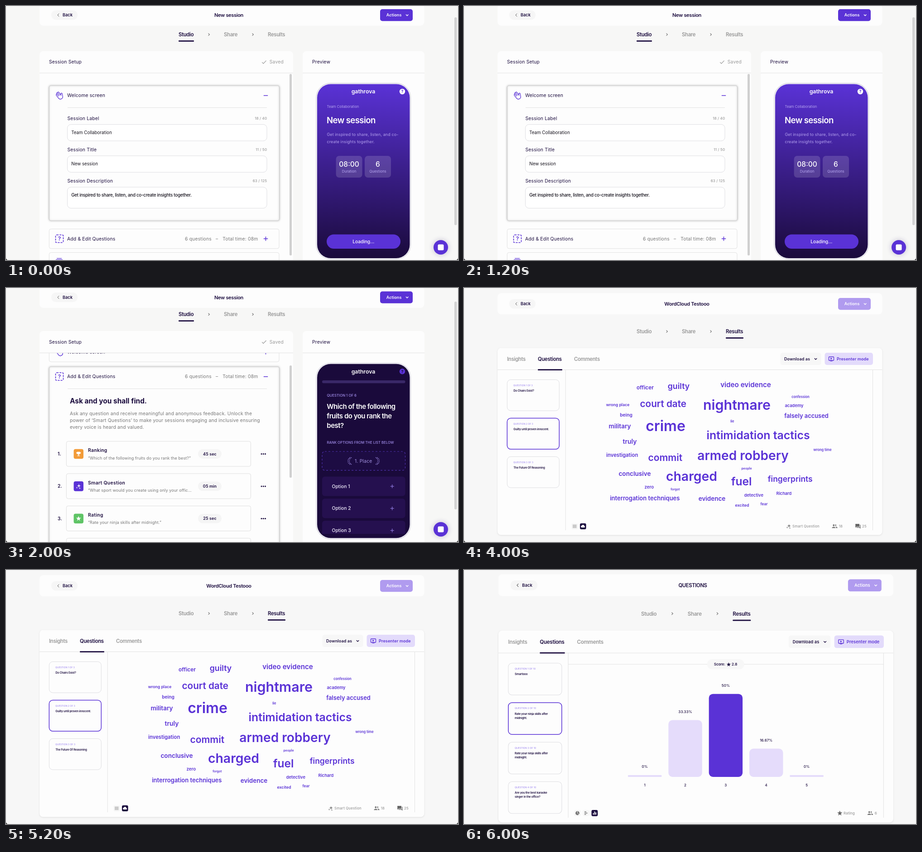
Recreate the animation shown at these times as an HTML page with a canvas. Size 998x561 px, loop 8 s.

```html
<!DOCTYPE html>
<html lang="en">
<head>
<meta charset="utf-8">
<title>Session builder</title>
<style>
html, body { margin: 0; width: 100%; height: 100%; overflow: hidden; background: #f7f7f7; }
canvas { display: block; width: 998px; height: 561px; }
</style>
</head>
<body>
<canvas id="stage"></canvas>
<script>
const W = 998, H = 561, LOOP = 8000, HOLD = 2000;
const PURPLE = '#5a32d6', INK = '#1c0d3f', GREY = '#999', MUTED = '#777', RULE = '#e2e2e2',
  CARD = '#fdfdfd', SOFT = '#f6f6f6', LILAC = '#e3dbfb', PALE = '#b09bef', NIGHT = '#1a0a3b';

// Type styles: weight, size, tracking
const LABEL = [400, 10.3, .2], BOLD = [600, 9, .1], TAB = [600, 11.3, -.3], TITLE = [600, 11, -.35],
  FIELD = [400, 9.75, 0], COUNT = [500, 7.9, .2], ITEM = [600, 10.3, .35], NOTE = [400, 9, .1],
  TINY = [600, 6.2, -.2], CHART = [500, 8, .05], FOOT = [500, 7.8, .15];

const canvas = document.getElementById('stage');
const dpr = window.devicePixelRatio || 1;
canvas.width = W * dpr;
canvas.height = H * dpr;
const c = canvas.getContext('2d');

function text(str, x, y, [weight, size, track], color = INK, align = 'left') {
  c.font = `${weight} ${size}px Inter, sans-serif`;
  c.letterSpacing = track + 'px';
  c.textAlign = align;
  c.fillStyle = color;
  c.fillText(str, x, y + size * .36);
}

function paint(fill, stroke, lw = 1) {
  if (fill) { c.fillStyle = fill; c.fill(); }
  if (stroke) { c.strokeStyle = stroke; c.lineWidth = lw; c.stroke(); }
}

function box(x0, y0, x1, y1, r, fill, stroke, lw) {
  c.beginPath();
  c.roundRect(x0, y0, x1 - x0, y1 - y0, r);
  paint(fill, stroke, lw);
}

function disc(x, y, r, fill) {
  c.beginPath();
  c.arc(x, y, r, 0, 7);
  paint(fill);
}

function line(color, lw, ...p) {
  c.beginPath();
  for (let i = 0; i < p.length; i += 2) c.lineTo(p[i], p[i + 1]);
  paint(null, color, lw);
}

function glyph(d, x, y, fill, stroke, lw = 1, turn = 0) {
  const path = new Path2D(d);
  c.save();
  c.translate(x, y);
  c.rotate(turn);
  if (fill) { c.fillStyle = fill; c.fill(path); }
  if (stroke) { c.strokeStyle = stroke; c.lineWidth = lw; c.stroke(path); }
  c.restore();
}

function star(x, y, r, color, points = 5, inner = .42) {
  c.beginPath();
  for (let i = 0; i < points * 2; i++) {
    const a = i * Math.PI / points - Math.PI / 2, q = i % 2 ? r * inner : r;
    c.lineTo(x + q * Math.cos(a), y + q * Math.sin(a));
  }
  c.closePath();
  paint(color);
}

const chevronDown = (x, y, color) => line(color, 1.4, x - 2.7, y - 1.3, x, y + 1.4, x + 2.7, y - 1.3);
const chevronRight = (x, y, color) => line(color, 1.2, x - 1.4, y - 2.6, x + 1.4, y, x - 1.4, y + 2.6);
const chevronLeft = (x, y, color) => line(color, 1, x + 1.6, y - 3.3, x - 1.6, y, x + 1.6, y + 3.3);

function minus(x, y, r = 4.7, color = PURPLE, lw = 1.5) {
  line(color, lw, x - r, y, x + r, y);
}

function plus(x, y, r = 4.7, color = PURPLE, lw = 1.5) {
  minus(x, y, r, color, lw);
  line(color, lw, x, y - r, x, y + r);
}

function sparkles(x, y, s, color) {
  star(x + .12 * s, y - .1 * s, s * .75, color, 4, .3);
  star(x - .6 * s, y + .55 * s, s * .38, color, 4, .3);
  star(x + .45 * s, y + .75 * s, s * .38, color, 4, .3);
}

function people(x, y) {
  glyph('M-4.2-2.3a2 2 0 1 0 4 0a2 2 0 1 0-4 0M-6 4V2.6Q-2.2-.6 1.6 2.6V4Z' +
    'M1-4.2a2 2 0 1 1 0 3.9Q2-2.2 1-4.2M2.2.8Q5 1 6 2.8V4H2.8Q3 2 2.2.8', x, y, '#777');
}

function hand(x, y) {
  glyph('M-5 1V-5a1.4 1.4 0 0 1 2.8 0V-7a1.4 1.4 0 0 1 2.8 0a1.4 1.4 0 0 1 2.8 0V1l1.8-2.4' +
    'a1.4 1.4 0 0 1 2.4 1.4L4.6 5.8A5.2 5.2 0 0 1-5 4ZM-2.2-5V0M.6-7V0M3.4-6V1', x, y, null, PURPLE, 1.3, -.65);
}

function questionIcon(x, y) {
  c.setLineDash([4.2, 2]);
  box(x - 8.5, y - 8.5, x + 8.5, y + 8.5, 2.5, null, PURPLE, 1.6);
  c.setLineDash([]);
  text('?', x, y, [600, 12, 0], PURPLE, 'center');
}

function corners() {
  glyph('M0 0V-5Q0 0 5 0Z', 0, H, '#111');
  glyph('M0 0V-5Q0 0-5 0Z', W, H, '#111');
}

function header(title, y, live) {
  box(74, y - 23.5, 923.5, y + 23.3, 8, CARD);
  box(100, y - 10.5, 158, y + 10.5, 10, SOFT);
  chevronLeft(115.5, y, '#555');
  text('Back', 125, y, [600, 9.2, 0]);
  text(title, 492, y, TITLE, INK, 'center');
  box(826, y - 13, 898, y + 13.2, 5, live ? PURPLE : PALE);
  text('Actions', 839.7, y, BOLD, '#fff');
  chevronDown(885.7, y, '#fff');
}

function steps(y, active) {
  [['Studio', 381, 415], ['Share', 481, 512], ['Results', 578, 617]].forEach(([name, x0, x1], i) => {
    text(name, x0, y, TAB, i === active ? INK : GREY);
    if (i === active) box(x0, y + 13, x1, y + 15.7, 1, INK);
  });
  chevronRight(448, y, MUTED);
  chevronRight(545, y, MUTED);
}

// Session editor

function panel(y0, y1) {
  c.save();
  c.shadowColor = 'rgba(0,0,0,.22)';
  c.shadowBlur = 4;
  box(95.3, y0, 603.5, y1, 4, CARD, '#cdcdcd', 1.2);
  c.restore();
}

function questionsHead(y) {
  questionIcon(118, y);
  text('Add & Edit Questions', 135, y, LABEL);
  text('6 questions', 395, y, LABEL, MUTED);
  text('–', 463, y, LABEL, MUTED);
  text('Total time: 08m', 478.3, y, LABEL, MUTED);
}

function editor(top, dy, body) {
  c.fillStyle = '#f7f7f6';
  c.fillRect(0, 0, W, H);
  header('New session', 20 + top, true);
  steps(63 + dy, 0);
  const y = 99.7 + dy;
  box(74, y, 634, 580, 8, CARD);
  box(655, y, 924, 580, 8, CARD);
  c.save();
  c.beginPath();
  c.rect(74, 148 + dy, 560, 500);
  c.clip();
  body();
  c.restore();
  line(RULE, 1, 74, y + 48.3, 634, y + 48.3);
  line(RULE, 1, 655, y + 48.3, 924, y + 48.3);
  text('Session Setup', 95, y + 24, LABEL);
  line(GREY, 1.2, 565.3, y + 24.5, 568.3, y + 27.5, 574.5, y + 21);
  text('Saved', 581.8, y + 24, LABEL, GREY);
  text('Preview', 676, y + 24, LABEL);
}

function overlay(scrollY) {
  box(990, scrollY, 995.5, scrollY + 459, 2.7, '#d2d2d2');
  c.save();
  c.shadowColor = 'rgba(60,40,120,.3)';
  c.shadowBlur = 12;
  disc(960, 533, 16, PURPLE);
  c.restore();
  box(953.5, 526.5, 966.5, 539.5, 2.5, '#fff');
  corners();
}

function phone(dy, fill, badge, mark) {
  box(685, 170.5 + dy, 893.5, 559 + dy, 32, '#f5f4fa', '#d6d5dd', 1.3);
  box(687, 172.5 + dy, 891.5, 557 + dy, 30, fill);
  text('gathrova', 789, 189 + dy, [600, 12.3, 0], '#fff', 'center');
  disc(875, 189 + dy, 6.2, badge);
  text('?', 875, 189 + dy, [700, 9, 0], mark, 'center');
}

function field(label, count, value, y, h, style = FIELD) {
  text(label, 135.5, y, LABEL);
  text(count, 576.2, y, COUNT, GREY, 'right');
  box(135.5, y + 13.6, 576, y + 13.6 + h, 8, '#fff', '#dedee2');
  text(value, 144.3, y + 31.3, style, '#15121c');
}

function chip(x, value, label) {
  box(x - 29, 331, x + 29, 379, 7, 'rgba(255,255,255,.15)');
  text(value, x, 349, [500, 15.5, 0], '#fff', 'center');
  text(label, x, 365, [400, 7.9, 0], '#b9a8f2', 'center');
}

function welcomeScene() {
  editor(0, 0, () => {
    panel(176, 474);
    hand(118, 198);
    text('Welcome screen', 135, 197.5, LABEL);
    minus(573.5, 197.7);
    line(RULE, 1, 136, 224.5, 576, 224.5);
    field('Session Label', '18 / 40', 'Team Collaboration', 248, 36.3);
    field('Session Title', '11 / 50', 'New session', 317.3, 36.3);
    field('Session Description', '63 / 125', 'Get inspired to share, listen, and co-create insights together.',
      386.5, 46.5, [500, 9.85, -.3]);
    box(95.3, 492.5, 603, 535.7, 4, CARD, RULE);
    questionsHead(514);
    plus(573.5, 514);
    box(95.3, 544.5, 603, 600, 4, CARD, RULE);
    line(PURPLE, 1.3, 112, 557.5, 123, 557.5);
    line(PURPLE, 1.3, 110, 560.6, 125, 560.6);
    box(626, 150, 631, 551, 2.5, '#d0d0d0');
  });
  const glow = c.createLinearGradient(0, 172, 0, 557);
  glow.addColorStop(0, PURPLE);
  glow.addColorStop(1, NIGHT);
  phone(0, glow, '#fff', PURPLE);
  text('Team Collaboration', 708.5, 222, [400, 7.5, .12], '#b9a8f2');
  text('New session', 708, 252, [600, 18.6, -.6], '#fff');
  text('Get inspired to share, listen, and co-', 708.5, 283.5, NOTE, '#b3a0ee');
  text('create insights together.', 708.5, 299.5, NOTE, '#b3a0ee');
  chip(757.6, '08:00', 'Duration');
  chip(821, '6', 'Questions');
  box(708, 504.5, 871, 536, 15.7, PURPLE);
  text('Loading...', 789.3, 520.3, [500, 10.2, -.05], '#fff', 'center');
  overlay(25);
}

function questionRow(i, title, quote, time, color) {
  const y = 366.3 + i * 71.35;
  text(i + 1 + '.', 114, y, [600, 10.2, .2]);
  box(133.3, y - 27.7, 540.5, y + 27.7, 4, CARD, '#dfdfdf');
  if (!title) return;
  box(149.5, y - 10.6, 171, y + 11, 4, color);
  if (i === 0) glyph('M-3-4.6H3V-3.6H5Q5.2-.2 2.4.2Q1.6 1.5.6 1.8V3.6H2.6V5H-2.6V3.6H-.6V1.8' +
    'Q-1.6 1.5-2.4.2Q-5.2-.2-5-3.6H-3Z', 160.2, y, '#fff');
  if (i === 1) sparkles(160.2, y, 6, '#fff');
  if (i === 2) star(160.2, y + .4, 5.8, '#fff');
  text(title, 181, y - 7.8, ITEM);
  text(quote, 181, y + 9.2, NOTE, MUTED);
  box(424, y - 10.2, 476, y + 10.6, 10.4, '#f5f5f5');
  text(time, 450, y, BOLD, INK, 'center');
  for (let k = -1; k < 2; k++) disc(568.3 + k * 4.2, y + .3, 1.5, INK);
}

function laurel(x, y, side) {
  for (let i = 0; i < 6; i++) {
    const a = -1.15 + i * .46, px = x + side * (7 * Math.cos(a) - 4), py = y + 8 * Math.sin(a);
    for (const k of [-1.5, 1.5]) {
      c.beginPath();
      c.ellipse(px + k, py, 1.4, .7, side * (k < 0 ? .8 : -.6), 0, 7);
      paint('#8f7dd0');
    }
  }
}

function option(n, y) {
  box(698, y - 21.5, 881.5, y + 21.5, 6, '#25104f');
  text('Option ' + n, 719.5, y, [500, 10.3, .05], '#f4f0ff');
  plus(852.7, y, 4, '#8f7be0', 1.2);
}

function questionsScene() {
  editor(.6, -4.7, () => {
    box(95.3, 120, 603, 163, 4, CARD, RULE);
    hand(118, 142);
    text('Welcome screen', 135, 141.3, LABEL);
    plus(573.5, 141.7);
    panel(174, 600);
    questionsHead(195.5);
    minus(573.5, 195.7);
    line(RULE, 1, 136, 222.5, 576, 222.5);
    text('Ask and you shall find.', 141, 249, [700, 15.4, 0]);
    ['Ask any question and receive meaningful and anonymous feedback. Unlock the',
      'power of ‘Smart Questions’ to make your sessions engaging and inclusive ensuring',
      'every voice is heard and valued.'].forEach((s, i) => text(s, 141, 277 + i * 15.2, LABEL, MUTED));
    questionRow(0, 'Ranking', '“Which of the following fruits do you rank the best?”', '45 sec', '#f29b38');
    questionRow(1, 'Smart Question', '“What sport would you create using only your offic...', '05 min', PURPLE);
    questionRow(2, 'Rating', '“Rate your ninja skills after midnight.”', '25 sec', '#5fc466');
    questionRow(3);
    box(626, 171, 631, 419, 2.5, '#d0d0d0');
  });
  phone(-4.7, NIGHT, PURPLE, NIGHT);
  box(698, 204, 881.5, 210.3, 3, '#3a2868');
  text('QUESTION 1 OF 6', 708.5, 237, [500, 7.8, 0], '#a38fec');
  ['Which of the following', 'fruits do you rank the', 'best?'].forEach((s, i) =>
    text(s, 708.3, 262 + i * 21, [600, 15, -.5], '#fff'));
  text('RANK OPTIONS FROM THE LIST BELOW', 708.5, 341.5, [500, 7.7, 0], '#a38fec');
  c.setLineDash([4, 4]);
  box(698, 361, 881.5, 402.7, 6, '#1d0c43', '#4d30ab', 1.2);
  c.setLineDash([]);
  text('1. Place', 789.3, 382, LABEL, '#a594e2', 'center');
  laurel(759.5, 382, -1);
  laurel(819.5, 382, 1);
  option(1, 438);
  option(2, 486.7);
  c.save();
  c.beginPath();
  c.rect(687, 500, 205, 43);
  c.clip();
  option(3, 535.5);
  c.restore();
  overlay(30);
}

// Results

function results(title, total, cards) {
  header(title, 35, false);
  steps(96, 2);
  c.save();
  c.shadowColor = 'rgba(0,0,0,.1)';
  c.shadowBlur = 3;
  c.shadowOffsetY = 1;
  box(74, 132.5, 923.5, 545.5, 8, CARD);
  c.restore();
  line(RULE, 1, 74, 180.6, 923.5, 180.6);
  line(RULE, 1, 224.2, 181, 224.2, 535);
  line(RULE, 1, 902.5, 181, 902.5, 535);
  text('Insights', 95, 156.8, TAB, GREY);
  text('Questions', 163, 156.8, TAB);
  text('Comments', 243, 156.8, TAB, GREY);
  box(163, 179.3, 217, 182, 1, INK);
  box(698.5, 143, 788.5, 170, 5, '#f7f7f7');
  text('Download as', 707, 156.6, BOLD);
  chevronDown(776.5, 156.6, INK);
  box(796.5, 143, 903, 170, 5, LILAC);
  box(805.5, 152, 816.5, 160, 1, null, PURPLE, 1.3);
  line(PURPLE, 1.3, 808.5, 161.2, 813.5, 161.2);
  glyph('M-1.6-2.2L2.2 0L-1.6 2.2Z', 811, 156, PURPLE);
  text('Presenter mode', 823, 156.6, [600, 9, .12], PURPLE);
  cards.forEach((lines, i) => {
    const y = 202.5 + i * 85, on = i === 1;
    box(95.3, y, 210.3, y + 68.5, 8, CARD, on ? PURPLE : '#dedee2', on ? 1.5 : 1);
    text(`QUESTION ${i + 1} OF ${total}`, 109, y + 12.3, [500, 5.1, 0], '#a48ff0');
    lines.forEach((s, k) => text(s, 109.2, y + (on ? 24.4 : 23.8) + k * 8.7, TINY));
  });
}

const WORDS = [
  ['officer', 400, 219.5, 11.9], ['guilty', 474, 217, 17.7], ['video evidence', 622, 214, 15.2],
  ['confession', 743, 240, 7.45], ['wrong place', 339.5, 258, 8.7], ['court date', 439.8, 256, 20.7],
  ['nightmare', 602.5, 258, 30.4], ['academy', 729, 259.5, 9.3], ['being', 358, 280.5, 10.2],
  ['falsely accused', 756, 282.5, 12.9], ['military', 344, 305.5, 13.6], ['crime', 445, 304.5, 32],
  ['lie', 592.3, 294, 7.4], ['intimidation tactics', 649.5, 325, 24.8], ['truly', 366, 339, 13.9],
  ['investigation', 349.2, 369, 11.3], ['commit', 444.3, 374, 21], ['armed robbery', 616, 369.5, 28.1],
  ['wrong time', 791.5, 357, 7.4], ['people', 624, 398, 7], ['conclusive', 377, 410.5, 13.6],
  ['charged', 502.5, 415.5, 28.4], ['fuel', 612.7, 427, 24.5], ['fingerprints', 720.2, 421.5, 17.4],
  ['zero', 408.8, 439.5, 9.7], ['forgot', 466.3, 445, 6.9], ['detective', 639.8, 457.5, 9.4],
  ['Richard', 706.3, 453.8, 9.2], ['interrogation techniques', 399.3, 464.5, 13], ['evidence', 547.5, 465, 13.5],
  ['excited', 614, 479.5, 8.8], ['fear', 662.5, 477, 8.2]
];

function cloudScene() {
  results('WordCloud Testooo', 3, [['Do Chairs Exist?'], ['Guilty until proven innocent.'], ['The Future Of Reasoning']]);
  for (const [word, x, y, size] of WORDS) text(word, x, y, [600, size, 0], PURPLE, 'center');
  box(237.5, 519.8, 251, 533, 3, '#f5f5f5');
  for (let k = -1; k < 2; k++) line('#888', 1, 240, 526.4 + k * 2.6, 248.5, 526.4 + k * 2.6);
  box(256, 519.8, 269.6, 533, 3, INK);
  glyph('M-2.5 2.8a2.1 2.1 0 0 1-.3-4.2a3 3 0 0 1 5.7.7a1.8 1.8 0 0 1-.1 3.5Z', 262.8, 526.2, '#fff');
  sparkles(717, 526, 5.5, '#666');
  text('Smart Question', 725, 526.3, FOOT, GREY);
  people(818.5, 526.3);
  text('18', 827.7, 526.3, FOOT, GREY);
  glyph('M-5.5-5.3H3.3V1H-3.3L-5.5 3.2ZM4.4-3.2H5.7V5.5L3.5 3.2H-3.2V2H4.4Z', 869.7, 526.3, '#666');
  text('25', 879, 526.3, FOOT, GREY);
  corners();
}

function ratingScene() {
  c.save();
  c.translate(0, -2.2);
  c.scale(1.0265, 1.0265);
  results('QUESTIONS', 10, [['Smartooo'], ['Rate your ninja skills after', 'midnight.'],
    ['Rate your ninja skills after', 'midnight.'], ['Are you the best karaoke', 'singer in the office?']]);
  c.restore();
  line(RULE, 1, 230, 208.2, 926, 208.2);
  box(537, 197, 618.5, 219.5, 11, '#f7f7f7');
  text('Score:', 552, 208.5, [600, 7.9, 0]);
  star(584.4, 208.8, 4.8, INK);
  text('2.8', 591, 208.5, [600, 8, 0]);
  [['0%', 4], ['33.33%', 125.5], ['50%', 183.3], ['16.67%', 62.5], ['0%', 4]].forEach(([pct, h], i) => {
    const x = 399.2 + i * 89.35, top = 457 - h;
    box(x - 37.2, top, x + 37.2, 457, Math.min(9, h / 3), i === 2 ? PURPLE : '#e5dcfb');
    text(pct, x, top - 18.5, CHART, INK, 'center');
    text(i + 1, x, 475, CHART, INK, 'center');
  });
  for (const x of [250.5, 269.3]) box(x - 7, 530, x + 7, 543.6, 3, '#f6f6f6');
  disc(250.5, 537, 4.4, '#777');
  line('#f6f6f6', .9, 250.5, 532.5, 250.5, 537, 254, 540);
  [4, 6.5, 3.5].forEach((w, i) => line('#777', 1.5, 266, 534 + i * 2.9, 266 + w, 534 + i * 2.9));
  box(281.5, 530, 295.3, 543.8, 3, INK);
  [3.5, 7, 5].forEach((h, i) => line('#fff', 1.8, 285.6 + i * 2.8, 540.4, 285.6 + i * 2.8, 540.4 - h));
  star(829.8, 537.3, 6, '#666');
  text('Rating', 838, 537, [500, 8, .1], GREY);
  people(897, 537);
  text('6', 906.8, 537, [500, 8, .1], GREY);
}

const SCENES = [welcomeScene, questionsScene, cloudScene, ratingScene];

function frame() {
  const t = performance.now() % LOOP;
  c.setTransform(dpr, 0, 0, dpr, 0, 0);
  c.fillStyle = '#f7f7f7';
  c.fillRect(0, 0, W, H);
  SCENES[Math.floor(t / HOLD)]();
  requestAnimationFrame(frame);
}
frame();
</script>
</body>
</html>
```
